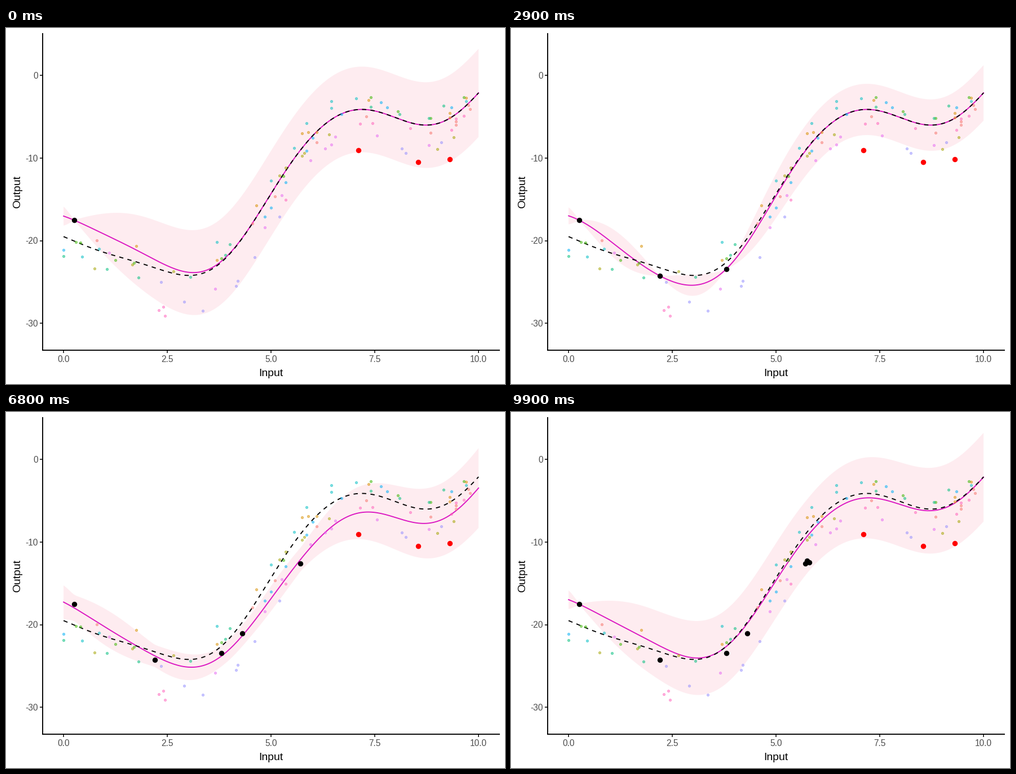
A matplotlib script that plays this animation: 885x632 px, repeating every 10 s.

```python
import numpy as np
import matplotlib.pyplot as plt
from matplotlib.animation import FuncAnimation

W, H, DPI = 885, 632, 100
PT = 72 / DPI  # points per pixel
LINE = 1.88 * PT
plt.rcParams["font.family"] = "Liberation Sans"

FRAMES = 100
MORPH = 7
ARRIVALS = [0, 14, 29, 44, 58, 72, 86, 100]

grid = np.linspace(0, 10, 201)


def kernel(a, b, scale):
    return np.exp(-0.5 * ((a[:, None] - b[None, :]) / scale) ** 2)


def through(*values):
    """Smooth curve through values spaced evenly over the input range."""
    knots = np.linspace(0, 10, len(values))
    scale = 1.8 * knots[1]
    trend = np.polyfit(knots, values, 1)
    weights = np.linalg.solve(kernel(knots, knots, scale),
                              values - np.polyval(trend, knots))
    return lambda x: np.polyval(trend, x) + kernel(x, knots, scale) @ weights


prior = through(-19.5, -21.45, -22.95, -24.2, -21.62, -14.3,
                -7.3, -4.18, -5.1, -5.83, -2.1)
prior_mean = prior(grid)

observed = np.array([(0.25, -17.5), (2.2, -24.25), (3.8, -23.42), (4.3, -21.06),
                     (5.7, -12.62), (5.75, -12.25), (5.8, -12.47)])
held_out = np.array([(7.1, -9.05), (8.55, -10.5), (9.3, -10.15)])


def posterior(count, width, scale, noise=0.0):
    """Mean and half band of a Gaussian process around the prior mean."""
    x, y = observed[:count].T
    gram = kernel(x, x, scale) + (noise + 1e-7) * np.eye(count)
    cross = kernel(grid, x, scale)
    gain = np.linalg.solve(gram, cross.T).T
    mean = prior_mean + gain @ (y - prior(x))
    var = width ** 2 * np.clip(1 - np.sum(gain * cross, axis=1), 0, None)
    var += 0.5 * np.exp(-0.5 * (grid / 0.1) ** 2)
    var += 1.6 * np.exp(-0.5 * ((10 - grid) / 0.5) ** 2)
    return np.array([mean, np.sqrt(var)])


def noisy_fit():
    """Fit that reads the scatter as noise: a wide, smooth band."""
    shift = through(2.0, -0.4, -2.35, -3.25, -2.36)
    half = through(2.7, 2.25, 2.25, 3.4, 5.15)
    return np.array([prior_mean + shift(grid), half(grid)])


states = [
    posterior(1, 5.18, 1.42),
    posterior(2, 3.8, 0.72),
    posterior(3, 3.1, 1.0),
    posterior(4, 3.1, 1.0),
    noisy_fit(),
    posterior(6, 4.2, 1.12, 6e-4),
    posterior(7, 5.4, 1.55, 3e-3),
]

fig = plt.figure(figsize=(W / DPI, H / DPI), dpi=DPI, facecolor="white")
LEFT, RIGHT, TOP, BOTTOM = 65.3, 874.9, 10, 572.3
ax = fig.add_axes([LEFT / W, 1 - BOTTOM / H, (RIGHT - LEFT) / W, (BOTTOM - TOP) / H])
ax.set_xlim(-0.5, 10.5)
ax.set_ylim(-33.27, 5.07)
ax.set_xticks(np.arange(0, 11, 2.5))
ax.set_yticks(np.arange(0, -31, -10))
ax.tick_params(length=4.8 * PT, width=LINE, color="#333333",
               labelbottom=False, labelleft=False)
for side in ("top", "right"):
    ax.spines[side].set_visible(False)
for side in ("left", "bottom"):
    ax.spines[side].set_linewidth(LINE)


def label(x, y, text, size, color, ha="center", rotation=0):
    fig.text(x / W, 1 - y / H, text, fontsize=size * PT, color=color, ha=ha,
             va="baseline", rotation=rotation, rotation_mode="anchor")


for v in ax.get_xticks():
    label(102.1 + 73.6 * v, 592.7, f"{v:.1f}", 15.5, "#4D4D4D")
for v in ax.get_yticks():
    label(57, 90 - 14.667 * v, f"{v:.0f}", 15.5, "#4D4D4D", ha="right")
label(470.1, 618, "Input", 19.4, "black")
label(25, 291, "Output", 19.4, "black", rotation=90)

# Each task strays from the prior mean by its own drift: early, middle, late.
tasks = {
    "#F8766D": (1, 0, -1), "#D89000": (3, 1, 1), "#A3A500": (-2, 2, -3),
    "#39B600": (0, 0, 1), "#00BF7D": (-3, 1, 1), "#00BFC4": (-1, 3, 1),
    "#00B0F6": (-2, -3, 1), "#9590FF": (2, -5, -3), "#E76BF3": (0, -3, -3),
    "#FF62BC": (-5, -5, -1),
}
rng = np.random.default_rng(4)
for color, drift in tasks.items():
    x = rng.integers(0, 201, 10) * 0.05
    y = prior(x) + np.interp(x, [1, 3.5, 8], drift) + rng.normal(0, 0.5, 10)
    ax.plot(x, y, "o", ms=4.2 * PT, mfc=color, mec=color, mew=0.95 * PT,
            alpha=0.5, zorder=5, clip_on=False)

ribbon, = ax.fill([0, 10, 10], [0, 0, 1], color="#FEECF0", lw=0, zorder=1)
curve, = ax.plot(grid, prior_mean, color="#DB15C1", lw=LINE, zorder=3)
ax.plot(grid, prior_mean, color="black", lw=LINE, ls=(0, (4, 4)),
        dash_capstyle="butt", zorder=4)
big = dict(ms=9.4 * PT, mew=0, zorder=6)
ax.plot(*held_out.T, "o", color="red", **big)
seen, = ax.plot([], [], "o", color="black", **big)


def draw(frame):
    i = max(k for k, start in enumerate(ARRIVALS[:-1]) if frame >= start)
    t = np.clip((frame - ARRIVALS[i + 1] + MORPH) / MORPH, 0, 1)
    mean, half = (1 - t) * states[i] + t * states[(i + 1) % len(states)]
    ribbon.set_xy(np.column_stack([np.r_[grid, grid[::-1]],
                                   np.r_[mean + half, (mean - half)[::-1]]]))
    curve.set_ydata(mean)
    seen.set_data(*observed[:i + 1].T)
    return ribbon, curve, seen


anim = FuncAnimation(fig, draw, frames=FRAMES, interval=100, repeat=True,
                     repeat_delay=0, blit=False)
plt.show()
```
